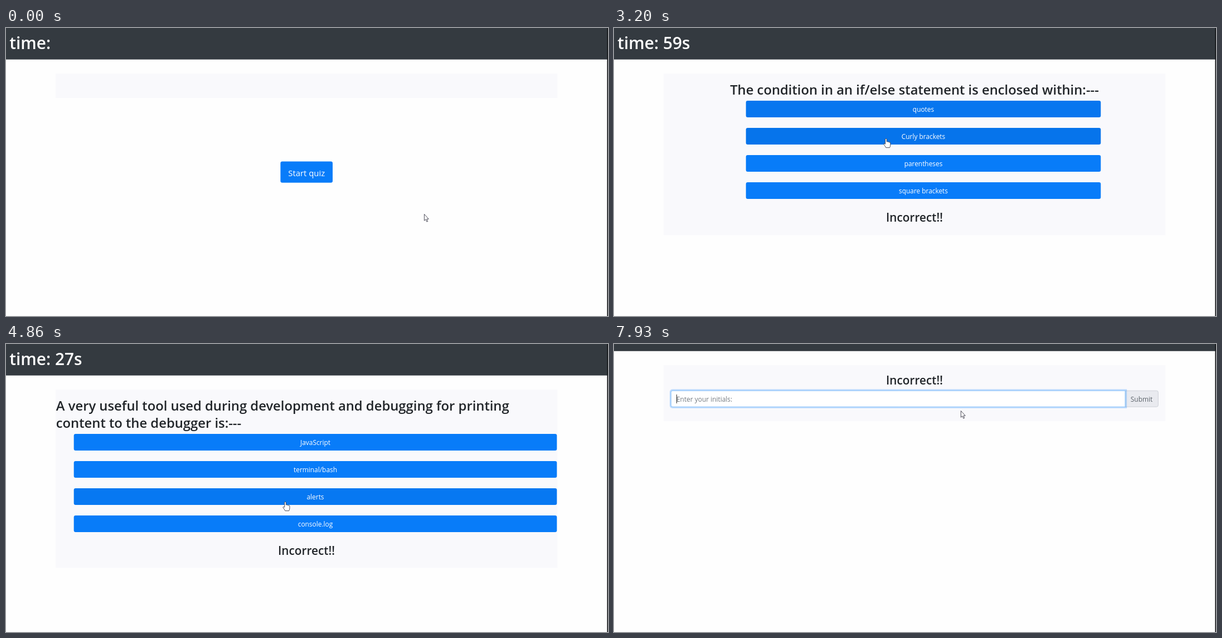
An HTML page with a canvas that plays this animation: 1080x519 px, repeating every 8000 ms.

```html
<!DOCTYPE html>
<html lang="en">
<head>
<meta charset="utf-8">
<title>Quiz</title>
<style>
html, body { margin: 0; width: 100%; height: 100%; overflow: hidden; background: #fefefe; }
canvas { display: block; }
</style>
</head>
<body>
<canvas id="stage" width="1080" height="519"></canvas>
<script>
const ctx = document.getElementById('stage').getContext('2d');
const LOOP = 8000, STEP = 1000 / 15, FADE = 150;
const FONT = '"Open Sans", "Noto Sans", sans-serif';
const BLUE = [8, 124, 249], HOVER = [4, 104, 214];
const FOCUS_AT = 6800, BLINK = 530;

const scenes = [
  { at: 0, bottom: 126 },
  { at: 860, bottom: 346, left: 312, right: 798,
    title: ['Commonly used data type Do Not include:---'],
    options: ['strings', 'booleance', 'alerts', 'numbers'] },
  { at: 2990, bottom: 373, left: 237, right: 873, wrong: 349,
    title: ['The condition in an if/else statement is enclosed within:---'],
    options: ['quotes', 'Curly brackets', 'parentheses', 'square brackets'] },
  { at: 4060, bottom: 373, left: 143, right: 967, wrong: 349,
    title: ['String values must be enclosed within --- when being assigned to variables'],
    options: ['commas', 'curly brackets', 'quotes', 'parentheses'] },
  { at: 4850, bottom: 403, left: 122, right: 988, wrong: 380, shift: 31,
    title: ['A very useful tool used during development and debugging for printing',
            'content to the debugger is:---'],
    options: ['JavaScript', 'terminal/bash', 'alerts', 'console.log'] },
  { at: 5320, form: true }
];

const clock = [[0, ''], [1830, ' 60s'], [2830, ' 59s'], [3830, ' 48s'], [4830, ' 27s']];

// pointer hot spot: time, x, y
const path = [
  [0, 750, 335], [590, 750, 335], [820, 540, 264], [1660, 538, 264], [1800, 533, 233],
  [2250, 525, 190], [2700, 505, 150], [3070, 492, 152], [3200, 488, 199],
  [3800, 491, 236], [4130, 494, 246], [4266, 497, 268], [4520, 500, 284],
  [4866, 501, 284], [5260, 505, 280], [5466, 514, 273], [5590, 514, 273],
  [6400, 590, 163], [6700, 616, 100], [7260, 618, 102], [7466, 622, 120], [LOOP, 622, 120]
];

const latest = (list, t, key) => list.filter(e => e[key] <= t).pop();

function pointer(t) {
  const i = Math.max(1, path.findIndex(p => p[0] >= t));
  const [t0, x0, y0] = path[i - 1], [t1, x1, y1] = path[i];
  let k = Math.max(0, (t - t0) / (t1 - t0));
  k = k * k * (3 - 2 * k);
  return { x: x0 + (x1 - x0) * k, y: y0 + (y1 - y0) * k };
}

const inside = (p, b) => p.x >= b.x && p.x < b.x + b.w && p.y >= b.y && p.y < b.y + b.h;

// share of the fade time just spent over the box
function hover(box, t, since) {
  let hits = 0;
  for (let i = 0; i < 10; i++) {
    const past = t - FADE * i / 10;
    if (past > since && inside(pointer(past), box)) hits++;
  }
  return hits / 10;
}

function rect(x, y, w, h, color) {
  ctx.fillStyle = color;
  ctx.fillRect(x, y, w, h);
}

function rounded(b, r, fill, stroke) {
  ctx.beginPath();
  ctx.roundRect(b.x, b.y, b.w, b.h, r);
  if (fill) { ctx.fillStyle = fill; ctx.fill(); }
  if (stroke) { ctx.strokeStyle = stroke; ctx.lineWidth = 1; ctx.stroke(); }
}

function text(str, x, y, size, color, align = 'left', weight = 400) {
  ctx.font = `${weight} ${size}px ${FONT}`;
  ctx.textAlign = align;
  ctx.fillStyle = color;
  ctx.fillText(str, x, y);
}

function button(box, label, size, baseline, t, since) {
  const k = hover(box, t, since);
  const c = BLUE.map((v, i) => Math.round(v + (HOVER[i] - v) * k));
  rounded(box, 3.2, `rgb(${c})`);
  text(label, box.x + box.w / 2, box.y + baseline, size, '#fff', 'center');
}

const startBox = { x: 492.4, y: 240.6, w: 93.6, h: 38.2 };
const inputBox = { x: 102, y: 83.7, w: 815, h: 30 };

function boxesOf(s) {
  if (!s.options) return s.form ? [] : [startBox];
  return s.options.map((_, i) =>
    ({ x: s.left - 0.3, y: 131 + (s.shift || 0) + i * 49, w: s.right - s.left + 0.6, h: 30 }));
}

function drawQuestion(s, t) {
  const centered = s.title.length === 1;
  s.title.forEach((line, i) => text(line, centered ? 539 : 89.8, 120 + i * 30.7,
    23.8, '#212529', centered ? 'center' : 'left', 600));
  boxesOf(s).forEach((b, i) => button(b, s.options[i], 11.9, 19.8, t, s.at));
}

function drawForm(t) {
  const k = Math.min(1, Math.max(0, (t - FOCUS_AT) / FADE));
  rounded({ x: 917, y: 84.2, w: 59.3, h: 29 }, [0, 3, 3, 0], '#e9eaef', '#cfd3d9');
  text('Submit', 946.5, 103.6, 11.9, '#5c636a', 'center');
  if (k) {
    const g = 2.6;
    rounded({ x: inputBox.x - g + 0.5, y: inputBox.y - g + 0.5, w: inputBox.w + 2 * g, h: inputBox.h + 2 * g - 1 },
      [5, 0, 0, 5], `rgba(0,123,255,${0.25 * k})`);
  }
  rounded({ x: 102.3, y: 84.2, w: 814.7, h: 29 }, [3, 0, 0, 3], '#fff', k > 0.5 ? '#8cc3fa' : '#ced4da');
  text('Enter your initials:', 112, 103.6, 11.9, '#747b82');
  const caretOn = t >= FOCUS_AT && Math.floor((t - FOCUS_AT) / BLINK) % 2 === 0;
  if (caretOn) rect(112, 91, 1, 16, '#333');
}

function shape(d, x, y) {
  ctx.save();
  ctx.translate(x, y);
  const p = new Path2D(d);
  ctx.fillStyle = '#fff';
  ctx.strokeStyle = '#3a3a48';
  ctx.lineWidth = 0.9;
  ctx.lineJoin = 'round';
  ctx.fill(p);
  ctx.stroke(p);
  ctx.restore();
}

function drawPointer(s, t) {
  const { x, y } = pointer(t);
  if (boxesOf(s).some(b => inside({ x, y }, b))) {
    shape('M-1.3 1.2Q0 -.6 1.3 1.2V6Q2.7 5 3.5 6.4Q5 5.6 5.7 7Q7.6 6.4 7.9 8.5V12' +
          'Q7.8 14 6.6 16.6H-.2Q-1.6 13.6 -4 10.8Q-4.4 8.4 -1.3 10.2Z', x, y);
  } else if (s.form && inside({ x, y }, inputBox)) {
    rect(x - 0.5, y - 7, 1, 14, '#333');
    for (const dy of [-7, 6]) rect(x - 2.5, y + dy, 5, 1, '#333');
  } else {
    shape('M.4 .5V12.2L3 9.8L4.9 14.2L6.7 13.4L4.9 9.2H8.3Z', x, y);
  }
}

function draw(t) {
  const s = latest(scenes, t, 'at');
  rect(0, 0, 1080, 519, '#fefefe');
  rect(0, 0, 1080, s.form ? 12.8 : 56.7, '#343a40');
  if (s.form) {
    rect(89, 38.4, 900.4, 100.6, '#f9f9fc');
    text('Incorrect!!', 539, 73, 20.8, '#212529', 'center', 600);
    drawForm(t);
  } else {
    text('time:' + latest(clock, t, 0)[1], 6.3, 38, 29.8, '#fff', 'left', 600);
    rect(89, 82, 900.4, s.bottom - 81.6, '#f9f9fc');
    if (s.options) drawQuestion(s, t);
    else button(startBox, 'Start quiz', 14.9, 26, t, s.at);
    if (s.wrong) text('Incorrect!!', 539, s.wrong, 20.8, '#212529', 'center', 600);
  }
  rect(1078.4, 0, 1.6, 519, '#15171a');
  drawPointer(s, t);
}

function frame(now) {
  const t = now % LOOP;
  draw(Math.floor((t + 7) / STEP) * STEP);
  requestAnimationFrame(frame);
}
requestAnimationFrame(frame);
</script>
</body>
</html>
```
